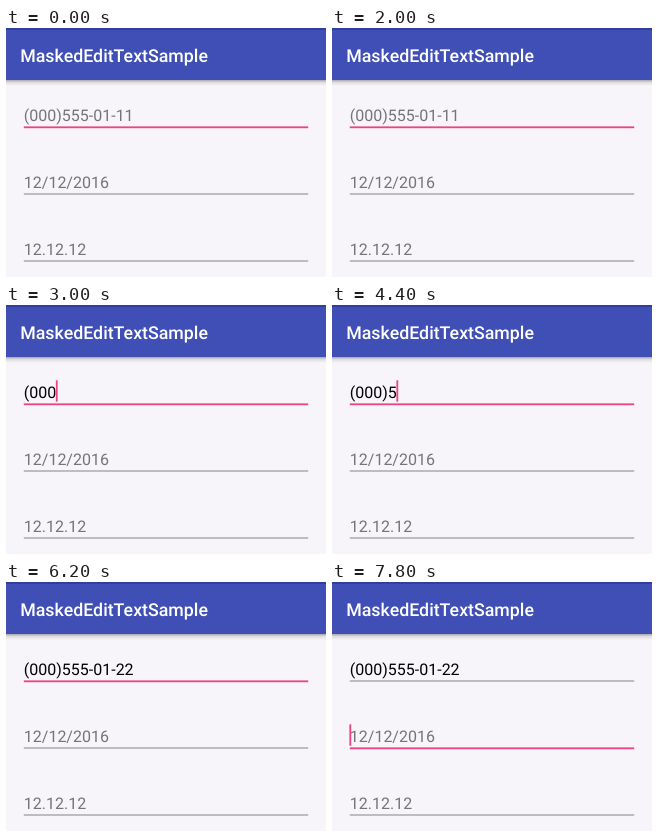
Animation, 320 px wide and 249 px high, one loop 8000 ms. Source, as an HTML page with a canvas:

```html
<!DOCTYPE html>
<html lang="en">
<head>
<meta charset="utf-8">
<title>MaskedEditTextSample</title>
<style>
html, body { margin: 0; width: 100%; height: 100%; overflow: hidden; background: #f7f5f9; }
canvas { display: block; }
</style>
</head>
<body>
<canvas width="320" height="249"></canvas>
<script>
const ctx = document.querySelector('canvas').getContext('2d');
const LOOP = 8000, LEFT = 17.8, ROW = 67;
const PHONE = '(000)555-01-22';
const HINTS = ['(000)555-01-11', '12/12/2016', '12.12.12'];

// [start time, visible characters of PHONE]
const typing = [[2400, 2], [2600, 3], [2800, 4], [4400, 6], [4600, 7], [4800, 8],
  [5000, 10], [5200, 11], [5400, 13], [5600, 14]];
// Times at which the cursor toggles, starting hidden
const blinks = [400, 1000, 1400, 2000, 2400, 3400, 4000, 6200, 6600, 7200, 7800];
const FOCUS_MOVE = 6800;

function box(color, x, y, w, h) {
  ctx.fillStyle = color;
  ctx.fillRect(x, y, w, h);
}

function label(text, color, font, x, y) {
  ctx.font = font + ' Roboto, sans-serif';
  ctx.fillStyle = color;
  ctx.fillText(text, x, y);
}

function drawBar() {
  const shadow = ctx.createLinearGradient(0, 52, 0, 58);
  shadow.addColorStop(0, 'rgba(0,0,0,.32)');
  shadow.addColorStop(.4, 'rgba(0,0,0,.1)');
  shadow.addColorStop(1, 'rgba(0,0,0,0)');
  box(shadow, 0, 52, 320, 6);
  box('#3f4fb5', 0, 0, 320, 52);
  box('#303f9f', 0, 0, 320, 2);
  label('MaskedEditTextSample', '#fff', '500 17.78px', 14.2, 34);
}

function drawField(row, typed, focused, cursor) {
  const y = row * ROW;
  label(typed || HINTS[row], typed ? '#000' : '#757477', '16px', LEFT, 92.7 + y);
  if (focused) box('#f0427f', LEFT, 98.4 + y, 284.4, 1.8);
  else box('#858487', LEFT, 98.5 + y, 284.4, 1);
  if (cursor) box('#f0427f', LEFT - .4 + ctx.measureText(typed).width, 75.3 + y, 1.8, 21.4);
}

function frame(now) {
  const t = now % LOOP;
  const count = typing.reduce((n, [start, chars]) => t >= start ? chars : n, 0);
  const cursor = blinks.filter(b => t >= b).length % 2 === 1;
  const focus = t >= FOCUS_MOVE ? 1 : 0;
  ctx.textRendering = 'geometricPrecision';
  box('#f7f5f9', 0, 0, 320, 249);
  drawBar();
  for (let row = 0; row < 3; row++) {
    const focused = row === focus;
    drawField(row, row ? '' : PHONE.slice(0, count), focused, focused && cursor);
  }
  requestAnimationFrame(frame);
}
requestAnimationFrame(frame);
</script>
</body>
</html>
```
